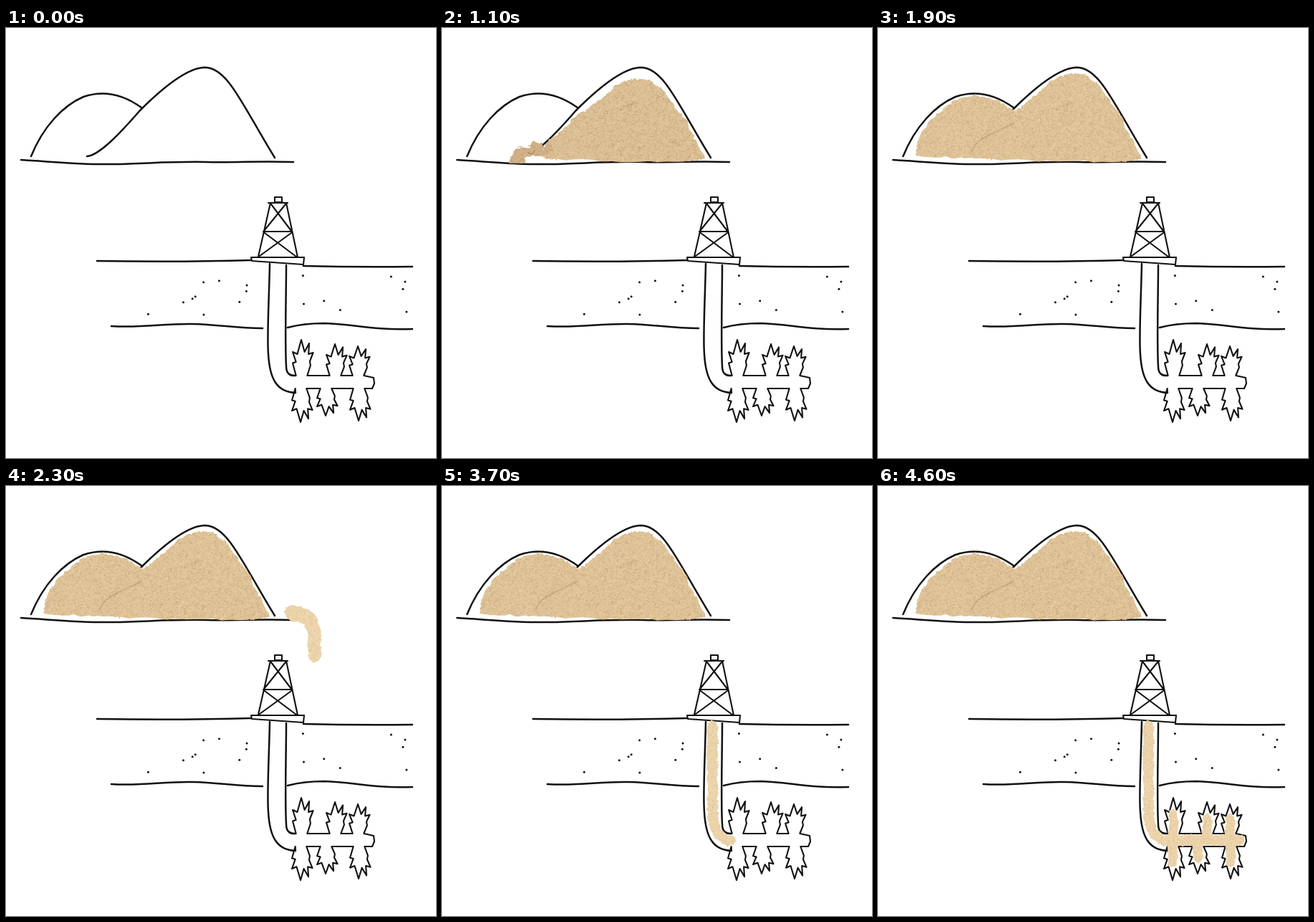
An HTML page with a canvas for the animation above (4.7 s loop, 600 by 600 pixels).

```html
<!DOCTYPE html>
<html lang="en">
<head>
<meta charset="utf-8">
<title>Sand and well</title>
<style>
html, body { margin: 0; width: 100%; height: 100%; overflow: hidden; background: #fff; }
canvas { display: block; width: 100vw; height: 100vh; }
</style>
</head>
<body>
<canvas id="stage" width="600" height="600"></canvas>
<script>
const LOOP = 4700, STEP = 100;
const ctx = document.getElementById('stage').getContext('2d');
const hash = n => { const s = Math.sin(n * 127.1 + 3) * 43758.5453; return s - Math.floor(s); };
const jitter = (n, size) => (hash(n) - 0.5) * 2 * size;
const clamp = v => Math.max(0, Math.min(1, v));
const parse = s => s.split(' ').map(p => p.split(',').map(Number));

// Line drawing
const ART = new Path2D(`
  M35 179 C52 137 80 108 108 96 C137 86 164 93 189 111
  M113 179 C130 178 160 146 187 115 C220 82 255 55 278 55 C310 56 330 108 375 181
  M21 184 C60 186 100 191 150 190 S230 186 280 187 S350 185 401 187
  M127 325 Q240 327 342 324 M415 332 Q490 334 567 333
  M147 416 C190 419 220 412 260 413 S320 419 358 419
  M393 418 Q415 412 445 412 C485 413 510 422 567 420
  M368 329 C367 380 364 430 366 455 C368 490 378 508 404 509
  M391 331 C391 370 389 440 391 472 Q391 486 404 485`);
const DERRICK = new Path2D(`
  M342 320 L416 320 415 330 343 325Z M375 236 H385 V243 H375Z M366 244 H393
  M369 244 L352 319 M391 244 L407 320 M359 284 H399
  M370 246 L398 283 M390 246 L360 283 M361 286 L405 319 M398 286 L354 318`);

// Cracks as [x, tip y] above and below the bore, all cut from one spiky leaf
const BORE = 494, WALL = 9;
const ABOVE = [[412, 435], [459, 441], [491, 444]];
const BELOW = [[492, 548], [446, 541], [411, 550]];
const LEAF = parse('-8,0 -13,.35 -8,.38 -13,.66 -6,.6 0,1 5,.66 12,.9 11,.6 18,.64 13,.4 14,.28 9,0');

function crackOutline([x, tip]) {
  const side = Math.sign(tip - BORE), base = BORE + side * WALL;
  const points = LEAF.map(([u, v]) => [x + u * 0.92, base + v * (tip - base)]);
  return side < 0 ? points : points.reverse();
}

const CRACKED = new Path2D();
[[404, 485], ...ABOVE.flatMap(crackOutline), [513, 488], [514, 496], [511, 503],
  ...BELOW.flatMap(crackOutline), [404, 509]].forEach(p => CRACKED.lineTo(...p));

function drawArt() {
  ctx.strokeStyle = ctx.fillStyle = '#111';
  ctx.lineCap = ctx.lineJoin = 'round';
  ctx.lineWidth = 2.5;
  ctx.stroke(ART);
  ctx.lineWidth = 2.1;
  ctx.stroke(CRACKED);
  ctx.stroke(DERRICK);
  for (let i = 0; i < 18; i++) {
    const x = i < 10 ? 158 + hash(i) * 196 : 402 + hash(i) * 160;
    ctx.beginPath();
    ctx.arc(x, 342 + hash(i + 60) * 62, 1.5, 0, 7);
    ctx.fill();
  }
}

// Grainy sand texture
function makeSand() {
  const tile = document.createElement('canvas');
  tile.width = tile.height = 600;
  const g = tile.getContext('2d');
  let seed = 7;
  const rnd = () => (seed = seed * 16807 % 2147483647) / 2147483647;
  g.fillStyle = '#dfc398';
  g.fillRect(0, 0, 600, 600);
  for (let i = 0; i < 90000; i++) {
    g.fillStyle = rnd() < 0.5 ? 'rgba(150,110,65,.2)' : 'rgba(250,230,192,.3)';
    g.fillRect(rnd() * 600, rnd() * 600, 1.3, 1.3);
  }
  return ctx.createPattern(tile, 'repeat');
}
const SAND = makeSand();

function fillSand(path, tint) {
  ctx.fillStyle = SAND;
  ctx.fill(path);
  ctx.fillStyle = tint;
  ctx.fill(path);
}

// Closed shape with a crumbly edge; loose sand is lumpier
function rough(points, seed, loose) {
  const path = new Path2D(), cuts = 14;
  points.forEach(([x, y], i) => {
    const [u, v] = points[(i + 1) % points.length];
    for (let j = 0; j < cuts; j++) {
      const n = seed + i * cuts + j, lump = seed + Math.floor(n / 5), k = j / cuts;
      path.lineTo(x + (u - x) * k + jitter(n, 1.6) + jitter(lump, loose * 7),
        y + (v - y) * k + jitter(n + 500, 1.6) + jitter(lump + 500, loose * 7));
    }
  });
  path.closePath();
  return path;
}

const HILLS = [
  { start: 0, end: 1300, x: 260, y: 187, seed: 11,
    shape: parse('131,179 150,153 193,115 218,95 243,73 264,64 287,64 306,77 337,120 368,183 338,187 160,184') },
  { start: 950, end: 1900, x: 125, y: 184, seed: 300,
    shape: parse('52,178 57,150 76,126 108,100 135,93 165,101 191,116 190,150 150,183') }
];

// Each pile spreads quickly along the ground, then rises
function drawHill({ start, end, x, y, seed, shape }, t) {
  if (t <= start) return;
  const rest = 1 - clamp((t - start) / (end - start));
  const wide = 1 - rest ** 3, high = 1 - rest ** 1.5;
  const pile = shape.map(([u, v]) => [x + (u - x) * wide, y + (v - y) * high]);
  const path = rough(pile, seed, rest);
  fillSand(path, `rgba(130,85,45,${0.2 * rest})`);
  ctx.save();
  ctx.clip(path);
  ctx.strokeStyle = `rgba(110,75,40,${0.06 + 0.4 * rest})`;
  ctx.lineWidth = 1.5;
  for (let i = seed; i < seed + 40; i++) {
    ctx.beginPath();
    ctx.arc(x + jitter(i, 110), y - hash(i + 90) * 100, 2 + hash(i + 40) * 5, 0.2, 2 + hash(i + 7));
    ctx.stroke();
  }
  ctx.restore();
}

function drawRidge() {
  ctx.strokeStyle = 'rgba(120,82,45,.18)';
  ctx.lineWidth = 2.5;
  ctx.stroke(new Path2D('M131 173 Q134 160 150 152 T189 133'));
}

// Sand laid as overlapping clods along a route
function route(d) {
  const line = document.createElementNS('http://www.w3.org/2000/svg', 'path');
  line.setAttribute('d', d);
  return line;
}

function trail(line, from, to, radius) {
  const path = new Path2D(), end = Math.min(to, line.getTotalLength());
  const dot = (x, y, r) => { path.moveTo(x + r, y); path.arc(x, y, r, 0, 7); };
  for (let d = Math.ceil(from / 3) * 3; d < end; d += 3) {
    const p = line.getPointAtLength(d), r = radius(d) * (0.85 + hash(d) * 0.25);
    const x = p.x + jitter(d + 1, 1.3), y = p.y + jitter(d + 2, 1.3);
    dot(x, y, r);
    for (let i = 0; i < 3; i++) {
      const a = hash(d * 5 + i) * 6.28;
      dot(x + Math.cos(a) * r, y + Math.sin(a) * r, 1.4);
    }
  }
  fillSand(path, 'rgba(255,236,200,.38)');
}

const SPILL = route('M362 168 L405 178 Q432 180 430 215 L433 255 Q440 300 442 312 L415 326');
const PIPE = route(`M377 334 L378 455 Q378 ${BORE} 404 ${BORE} H506`);
const CRACKS = [...ABOVE, ...BELOW].map(([x, tip]) => ({
  line: route(`M${x} ${BORE} V${BORE + (tip - BORE) * 0.62}`),
  at: PIPE.getTotalLength() - (506 - x)
}));

function drawFlow(t) {
  trail(SPILL, Math.max(0, (t - 2100) * 0.19), (t - 1900) * 0.3, d => 11 - d * 0.024);

  const reach = PIPE.getTotalLength() * clamp((t - 2750) / 1850) ** 0.68;
  trail(PIPE, 0, reach, () => 6.8);
  for (const { line, at } of CRACKS) {
    trail(line, 0, line.getTotalLength() * clamp((reach - at) / 14), d => 7 - d * 0.05);
  }
}

function frame(now) {
  const t = Math.floor(now % LOOP / STEP) * STEP;
  ctx.fillStyle = '#fff';
  ctx.fillRect(0, 0, 600, 600);
  drawArt();
  HILLS.forEach(hill => drawHill(hill, t));
  if (t >= 1500) drawRidge();
  drawFlow(t);
}

const begin = performance.now();
function tick() {
  frame(performance.now() - begin);
  requestAnimationFrame(tick);
}
tick();
</script>
</body>
</html>
```
